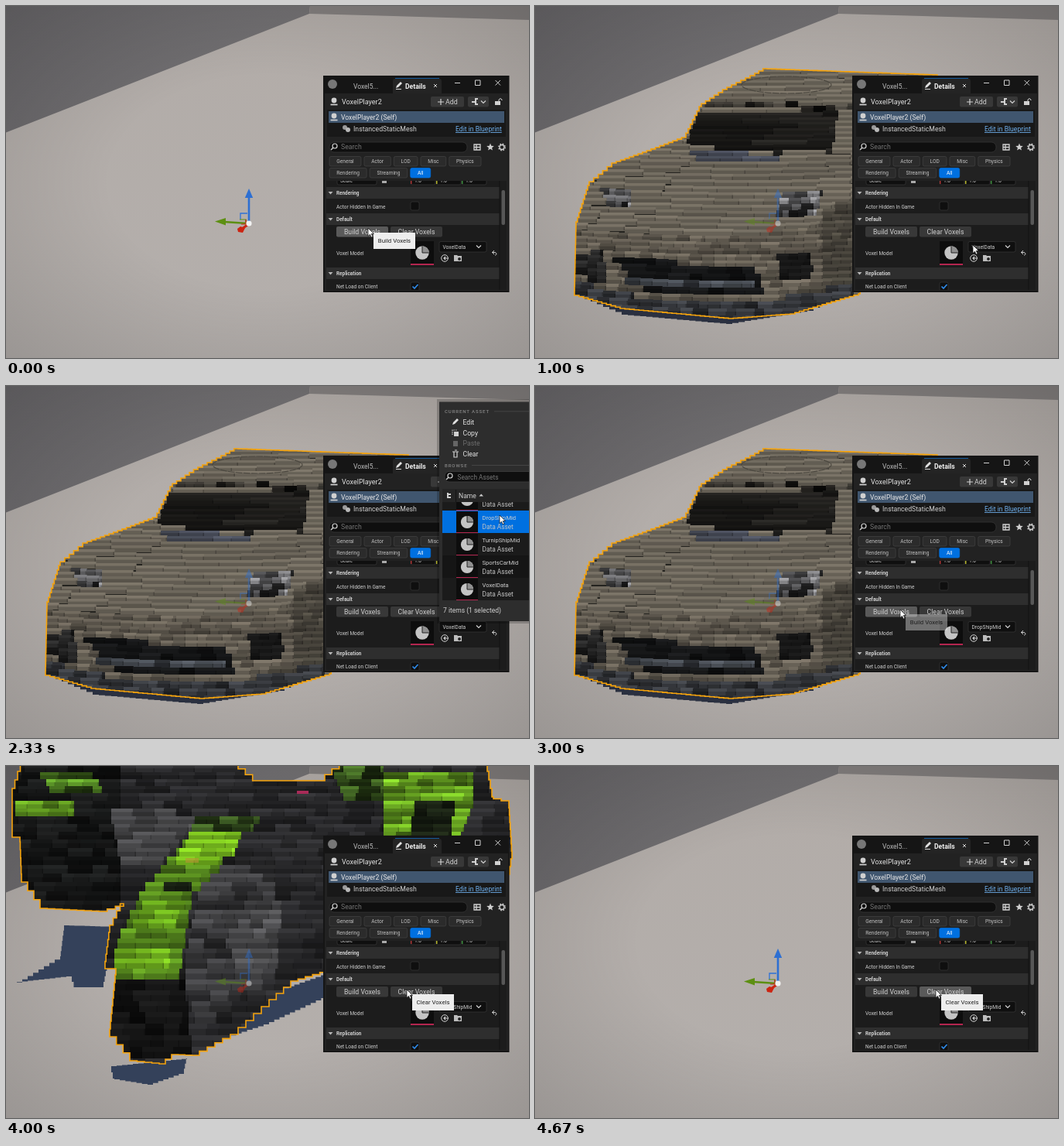
An HTML page for the animation above (5010 ms loop, 676x455 px).

```html
<!DOCTYPE html>
<html lang="en">
<head>
<meta charset="utf-8">
<title>Voxel builder</title>
<style>
html,body{margin:0;width:100%;height:100%;overflow:hidden;background:#a8a19d}
svg{display:block;width:100%;height:100%}
text{font-family:Roboto,"Open Sans",sans-serif;white-space:pre}
</style>
</head>
<body>
<svg id="stage" viewBox="0 0 676 455" preserveAspectRatio="none"></svg>
<script>
const LOOP = 5010, BEAT = 1000 / 3, LAST = 14;
const LIGHT = '#d0d0d0', INK = '#0f0f0f', BLUE = '#0070e0', STEEL = '#40566f', ORANGE = '#f5a30c';

const rect = (x, y, w, h, fill, more = '') =>
  `<rect x="${x}" y="${y}" width="${w}" height="${h}" fill="${fill}" ${more}/>`;
const text = (x, y, s, size = 8.7, fill = LIGHT, more = '') =>
  `<text x="${x}" y="${y}" font-size="${size}" fill="${fill}" ${more}>${s}</text>`;
const line = (d, stroke = LIGHT, w = 1, more = '') =>
  `<path d="${d}" fill="none" stroke="${stroke}" stroke-width="${w}" ${more}/>`;
const shape = (d, fill, more = '') => `<path d="${d}" fill="${fill}" ${more}/>`;
const disc = (x, y, r, fill, more = '') => `<circle cx="${x}" cy="${y}" r="${r}" fill="${fill}" ${more}/>`;
const group = (body, more = '') => `<g ${more}>${body}</g>`;
const each = (list, make) => list.map(make).join('');

// ---- voxel models ----
let seed = 77;
const rnd = () => (seed = seed * 16807 % 2147483647) / 2147483647;
const points = s => s.split(' ').map(p => p.split(',').map(Number));
const tint = (hex, f) =>
  `rgb(${[1, 3, 5].map(i => Math.min(255, Math.round(parseInt(hex.substr(i, 2), 16) * f)))})`;

function inside(pts, x, y) {
  let hit = false;
  pts.forEach(([ax, ay], i) => {
    const [bx, by] = pts.at(i - 1);
    if ((ay > y) !== (by > y) && x < (bx - ax) * (y - ay) / (by - ay) + ax) hit = !hit;
  });
  return hit;
}

// turns a few corner points into a blocky closed path
function stairs(outline, unit) {
  const pts = points(outline);
  let d = `M${pts.at(-1)}`;
  pts.forEach(([bx, by], i) => {
    const [ax, ay] = pts.at(i - 1);
    const n = Math.max(1, Math.round(Math.max(Math.abs(bx - ax), Math.abs(by - ay)) / unit));
    for (let k = 1; k <= n; k++)
      d += `H${(ax + (bx - ax) * k / n).toFixed(1)}V${(ay + (by - ay) * k / n).toFixed(1)}`;
  });
  return d + 'Z';
}

// Each region is [outline, colour, block width, contrast]; later regions win.
function model(id, outline, unit, { far, near, bend }, regions) {
  const areas = regions.map(([o, color, w, jitter]) => ({ pts: points(o), color, w, jitter }));
  const areaAt = (x, y) => areas.findLast(a => inside(a.pts, x, y));
  const path = stairs(outline, unit);
  let out = shape(path, '#24231f');
  for (let y = -10, h; y < 430; y += h) {
    h = Math.round(far + (near - far) * Math.max(0, y) / 400);
    const row = (rnd() - .5) * .1;
    for (let x = 0, w; x < 660; x += w) {
      const top = Math.round(y - bend * ((x - 250) / 200) ** 2);
      const area = areaAt(x + 2, top + h / 2);
      w = 4;
      if (!area) continue;
      const want = area.w * (.6 + rnd() * .8);
      while (w < want && areaAt(x + w + 2, top + h / 2) === area) w += 4;
      const f = 1 + row + (rnd() - .5) * 2 * area.jitter;
      out += rect(x, top, w + .5, h + 1, tint(area.color, f * .9))
        + rect(x, top, w + .5, h * .45, tint(area.color, f * 1.12))
        + rect(x + w - 1.5, top + h * .45, 2, h * .55, tint(area.color, f * .7));
    }
  }
  return `<clipPath id="${id}Clip"><path d="${path}"/></clipPath>`
    + group(out, `clip-path="url(#${id}Clip)"`) + line(path, ORANGE, 1.6);
}

const carEdge = '520,89 300,81 284,90 248,108 215,130 195,170 150,187 105,203 70,232 53,285 51,374 110,391 250,404 330,398 418,372';
const car = () => shape(stairs('56,372 418,366 360,394 255,411 120,399', 8), '#2a3040')
  + model('car', carEdge, 6, { far: 6, near: 9, bend: 8 }, [
    ['40,60 530,60 530,420 40,420', '#6a6459', 44, .06],
    ['222,126 412,126 412,134 216,134', '#37342f', 10, .9],
    ['212,135 392,135 384,188 300,190 194,180', '#1d1c1a', 60, .35],
    ['200,188 320,192 316,201 208,198', '#464a56', 22, .2],
    ['50,284 230,302 412,276 412,380 50,380', '#5e584e', 15, .2],
    ['372,262 412,250 412,366 372,370', '#48443c', 14, .2],
    ['84,234 126,238 126,262 96,264', '#505052', 10, .8],
    ['320,244 372,238 364,268 312,272', '#565658', 10, .8],
    ['54,322 88,316 94,358 54,350', '#232323', 12, .5],
    ['96,324 290,342 296,376 150,374', '#141516', 24, .4],
    ['112,352 284,358 284,367 118,362', '#3c4046', 18, .4],
    ['314,324 354,318 360,348 316,352', '#151515', 13, .4],
    ['50,356 150,380 290,384 412,358 412,420 50,420', '#303236', 16, .4]
  ])
  + '<ellipse cx="325" cy="102" rx="58" ry="11" fill="none" stroke="#4c4840" stroke-width="1.2" stroke-dasharray="9 1"/>';

const shipEdge = '22,-4 8,40 8,92 18,98 20,150 44,184 120,188 152,178 134,215 128,262 142,270 134,350 160,381 198,385 ' +
  '214,373 240,374 290,347 340,302 368,278 415,264 640,200 654,110 650,45 630,40 622,-4 440,-4 412,19 328,19 300,-4';
const ship = () => group(each([
  '75,206 142,208 126,286 90,286 85,272 14,280 70,246',
  '136,388 234,378 230,398 190,412 140,404',
  '262,360 345,292 414,268 414,300 340,334'
], o => shape(stairs(o, 7), '#34415a')))
  + model('ship', shipEdge, 10, { far: 9, near: 16, bend: 0 }, [
    ['0,-9 670,-9 670,400 0,400', '#262628', 24, .35],
    ['0,-9 150,-9 150,190 0,190', '#151616', 21, .5],
    ['12,48 88,46 88,66 12,70', '#5f9620', 20, .3],
    ['40,6 110,4 124,34 60,34', '#426b1d', 18, .6],
    ['134,54 250,62 232,90 200,128 150,132', '#454547', 24, .25],
    ['246,66 330,66 310,90 236,90', '#30481c', 20, .5],
    ['420,0 490,0 490,50 440,48', '#304a1a', 20, .6],
    ['258,130 350,112 350,270 250,340 226,274', '#363638', 22, .4],
    ['280,186 356,176 350,262 300,280', '#48484a', 22, .25],
    ['490,10 606,4 604,46 588,92 486,92', '#5a8e1d', 21, .45],
    ['528,42 580,42 576,92 524,92', '#1a2214', 20, .4],
    ['136,266 230,268 240,374 134,384', '#121212', 19, .5],
    ['236,90 304,90 270,140 240,170 224,274 136,272 142,232 178,160', '#4d7a1b', 22, .25],
    ['236,90 304,90 298,110 262,130 216,132', '#7bc01f', 26, .15],
    ['182,172 234,172 218,206 162,206', '#649f1c', 22, .2],
    ['140,234 212,234 212,256 138,256', '#6fae1e', 22, .15],
    ['204,147 240,147 240,168 204,168', '#182013', 20, .2]
  ])
  + rect(232, 119, 17, 6, '#b99435', 'opacity=".6"') + rect(376, 32, 15, 4, '#a82b58');

// ---- editor widgets ----
const pie = (x, y, r) => disc(x, y, r, '#c4c4c4')
  + shape(`M${x} ${y}v${-r}a${r} ${r} 0 0 1 ${r} ${r}z`, '#8f8f8f') + line(`M${x} ${y - r}v${r}h${r}`, '#222');
const thumb = (x, y, s) => rect(x, y, s, s + 1, '#0d0d0d') + pie(x + s / 2, y + s / 2, s * .29) + rect(x, y + s - 1, s, 2, '#b3254f');
const lens = (x, y) => line(`M${x - 2} ${y + 2}l-3 3`, LIGHT, 1.5) + disc(x, y, 3, 'none', `stroke="${LIGHT}" stroke-width="1.2"`);
const field = (x, y, w, h, r = 2) => rect(x, y, w, h, INK, `rx="${r}" stroke="#383838" stroke-width=".7"`);
const chevron = (x, y) => line(`M${x - 3} ${y - 1.5}l3 3 3-3`, LIGHT, 1.2);
const pencil = (x, y) => shape(`M${x} ${y}l1-3 5-5 2 2-5 5z`, '#e0e0e0');
const actor = (x, y) => disc(x, y, 3.4, LIGHT) + line(`M${x - 4.5} ${y + 5.5}h9`, LIGHT, 1.7);
const header = (y, label) => rect(414, y, 224, 15, '#2e2e2e') + shape(`M416.5 ${y + 6}h6l-3 3.6z`, '#b8b8b8')
  + text(427, y + 10, label, 6.4, LIGHT, 'font-weight="700"');
const button = (id, x, label) => rect(x, 285, 67, 13.5, '#383838', `id="${id}" rx="2"`)
  + text(x + 33.5, 295, label, 8.7, LIGHT, 'text-anchor="middle"');

const pen = document.createElement('canvas').getContext('2d');
pen.font = '66px Roboto, sans-serif';
function pills(y, labels) {
  let x = 418;
  return each(labels, label => {
    const w = pen.measureText(label).width / 10 + 18.5, on = label === 'All', left = x;
    x += w + 4;
    return rect(left, y, w, 12.5, on ? BLUE : '#2b2b2b', `rx="2" stroke="${on ? BLUE : '#444'}" stroke-width=".7"`)
      + text(left + w / 2, y + 8.7, label, 6.6, on ? '#fff' : '#c0c0c0', 'text-anchor="middle"');
  });
}

const titleBar = () => rect(410, 90, 240.5, 280, '#151515') + disc(422, 101, 6, '#777')
  + text(449, 106.5, 'Voxel5...', 8.5, '#bcbcbc')
  + shape('M500 113V97q0-3 3-3h57q3 0 3 3v16z', '#242424') + rect(503, 93, 57, 1, '#155a9c')
  + pencil(504, 106) + line('M504 107.5h7') + text(516, 106.5, 'Details', 8.6, '#f0f0f0', 'font-weight="700"')
  + line('M553 101l4 4m0-4l-4 4M580 99.5h7M606.5 96h6.5v6.5h-6.5zM632.5 96l6.5 6.5m0-6.5l-6.5 6.5');

const actorTree = () => rect(412, 113, 237, 255, '#222')
  + actor(424, 122) + text(434, 127, 'VoxelPlayer2', 9, '#e0e0e0')
  + rect(549, 117, 43, 13.5, '#383838', 'rx="2"') + line('M558 124h8M562 120v8', LIGHT, 1.2) + text(568, 127, 'Add', 8.9)
  + rect(597, 117, 27, 13.5, '#383838', 'rx="2"') + line('M602 124h6m2-4h-3v7h3', LIGHT, 2) + chevron(617, 124)
  + rect(632, 123, 7, 5, LIGHT) + line('M637 123v-2q2-3 4 0v1')
  + rect(415, 134, 231, 35, '#181818') + rect(417, 136, 227, 15, STEEL)
  + actor(424, 142) + text(433, 147, 'VoxelPlayer2 (Self)', 8.6, '#e8e8e8')
  + disc(438, 157, 3, '#9a9a9a') + disc(442, 160, 3, '#b8b8b8') + text(449, 162, 'InstancedStaticMesh')
  + text(581, 162, 'Edit in Blueprint', 8.6, '#6fb0ee', 'text-decoration="underline"');

const star = (x, y, r) => 'M' + Array.from({ length: 10 }, (_, i) => {
  const a = i * Math.PI / 5, d = i % 2 ? r * .45 : r;
  return [x + d * Math.sin(a), y - d * Math.cos(a)].map(n => n.toFixed(1));
}).join('L') + 'Z';
const filters = () => field(418, 176, 178, 13, 6) + lens(425, 181) + text(433, 185, 'Search', 8.7, '#747474')
  + line('M605 179h8v7h-8zM605 182.5h8M608 179v7', LIGHT, 1.3) + shape(star(626, 182.5, 5), LIGHT)
  + disc(641, 182.5, 3, 'none', `stroke="${LIGHT}" stroke-width="1.3"`)
  + disc(641, 182.5, 4.3, 'none', `stroke="${LIGHT}" stroke-width="1.3" stroke-dasharray="1.7 1.7"`)
  + pills(194.5, ['General', 'Actor', 'LOD', 'Misc', 'Physics']) + pills(209.5, ['Rendering', 'Streaming', 'All']);

const properties = () => rect(414, 226, 233, 141, '#1c1c1c')
  + field(428, 222, 51, 9) + text(432, 228, 'Scale', 6.5) + rect(486, 225, 6, 4, '#aaa')
  + each(['#a33', '#b5b52a', '#3a8a3a'], (c, i) => field(523 + i * 33, 222, 32, 9)
    + rect(523 + i * 33, 224, 1.5, 6, c) + text(528 + i * 33, 228, '1.0', 6.5))
  + header(234, 'Rendering') + text(427, 261.5, 'Actor Hidden In Game', 6.5) + field(523, 253, 11, 11)
  + header(268, 'Default') + button('build', 427, 'Build Voxels') + button('clear', 497, 'Clear Voxels')
  + text(427, 322, 'Voxel Model', 6.5) + thumb(523, 304, 30)
  + field(560, 304.5, 61, 13.5) + text(564.5, 313.7, '', 6.6, LIGHT, 'id="pick"') + chevron(611, 311)
  + disc(567, 326, 4.3, 'none', `stroke="${LIGHT}"`) + line('M572 326h-6m2-2l-2 2 2 2', LIGHT, 1.2)
  + shape('M579 322h4l1 1h5v7h-10z', '#bdbdbd') + disc(586, 327, 2.5, '#222', `stroke="${LIGHT}"`)
  + line('M628.5 318.5h4q3 1.5 0 4M631 316l-2.5 2.5 2.5 2.5')
  + header(338, 'Replication') + text(427, 365, 'Net Load on Client', 6.5)
  + field(523, 357, 11, 11) + line('M525.5 362.5l2.5 2.5 4.5-5', '#2f8be8', 1.7)
  + rect(637.5, 226, .8, 141, '#111') + rect(640.5, 238, 4.5, 45, '#575757', 'rx="2"');

const panel = () => titleBar() + actorTree() + filters() + group(properties(), 'clip-path="url(#listClip)"');

const assets = ['DropShip', 'DropShipMid', 'TurnipShipMid', 'SportsCarMid', 'VoxelData'];
const shade = i => i % 2 ? '#151515' : '#1b1b1b';
function menu() {
  const caption = (y, s, x) => text(567, y, s, 6.1, '#858585', 'letter-spacing=".85" font-weight="500"') + rect(x, y - 2.5, 676 - x, .8, '#4a4a4a');
  const entry = (name, i) => {
    const y = 132 + i * 29;
    return rect(564, y, 112, 29, shade(i), `id="row${i}"`) + thumb(582, y + 1, 28)
      + text(615.5, y + 12, name, 7.6) + text(615.5, y + 24, 'Data Asset', 8.3, '#c4c4c4');
  };
  return rect(557, 17, 125, 290, '#000', 'opacity=".2"') + rect(560, 20.5, 120, 283.5, '#2d2d2d')
    + caption(35, 'CURRENT ASSET', 631) + caption(104.5, 'BROWSE', 602)
    + each(['Edit', 'Copy', 'Paste', 'Clear'], (s, i) => text(590.5, 50 + i * 13.7, s, 8.7, s === 'Paste' ? '#6d6d6d' : '#e4e4e4'))
    + pencil(577, 50) + rect(579, 59, 6, 6, LIGHT) + line('M577 63v-6h6', LIGHT, 1.2, 'stroke-dasharray="1.5 1"')
    + rect(578, 71, 6, 7, '#666') + line('M577 85h8M579 85v7h4v-7M580 83h3', LIGHT, 1.2)
    + rect(567, 110.5, 116, 13.5, INK, 'id="search" rx="6"') + lens(574, 116) + text(583.5, 120.5, 'Search Assets', 8.3, '#777')
    + rect(582.5, 112.5, 1, 9.5, LIGHT, 'id="caret"')
    + rect(564, 133, 112, 17, '#252525') + line('M571 138v7m0-5h4m-4 4h4', LIGHT, 2)
    + rect(581, 134, .8, 16, '#111') + text(585, 145, 'Name', 8.6) + shape('M611.5 142.5h5.5l-2.75-3z', LIGHT)
    + group(each(assets, entry), 'clip-path="url(#menuClip)"')
    + text(565, 292.5, '7 items (1 selected)', 8.5);
}

const gizmo = () => line('M303 276v-8h9', '#2e72d8', 1.3)
  + line('M314 280V247', '#2d6fd2', 2.6) + shape('M314 236l5.2 12h-10.4z', '#2d6fd2')
  + line('M312 281l-30-2', '#5d8f12', 2.6) + shape('M270 278.5l14-4.5v9.5z', '#5d8f12') + line('M302 276h8v6', '#5d8f12', 1.2)
  + line('M312 283l-7 5', '#cc2412', 3) + line('M304 282h6v-6', '#cc2412', 1.2)
  + shape('M299 288l4-3 6 2-3 6-6-1z', '#cc2412') + disc(314, 281, 3.6, '#f1f1f1');

const room = () => rect(0, 0, 676, 455, 'url(#floor)')
  + shape('M0 0H393L392 10L0 163.5Z', 'url(#wall)') + shape('M393 0H676V18L392 10Z', '#827e7d')
  + rect(0, 0, 676, 455, 'url(#vignette)');

const stage = document.getElementById('stage');
stage.innerHTML = `<defs>
<linearGradient id="floor" x1="0" y1="0" x2="0" y2="1"><stop offset="0" stop-color="#b2aca8"/><stop offset="1" stop-color="#b4afac"/></linearGradient>
<linearGradient id="wall" x1="0" y1="0" x2="1" y2=".3"><stop offset="0" stop-color="#69676a"/><stop offset="1" stop-color="#737173"/></linearGradient>
<radialGradient id="vignette" r=".75"><stop offset=".4" stop-color="#000" stop-opacity="0"/><stop offset="1" stop-color="#000" stop-opacity=".16"/></radialGradient>
<clipPath id="listClip"><rect x="412" y="226" width="238" height="141"/></clipPath>
<clipPath id="menuClip"><rect x="560" y="150" width="116" height="127"/></clipPath></defs>`
  + room() + group(car(), 'id="car"') + shape(stairs(carEdge, 6), '#8c8e92', 'id="haze" opacity=".16"') + group(ship(), 'id="ship"')
  + group(gizmo(), 'id="gizmo"') + panel() + group(menu(), 'id="menu"')
  + group(rect(593, 316, 140, 22, '#a0a0a0') + text(599.5, 329.5, '/Game/VoxelModels/VoxelData', 7.5, '#2c2c2c'), 'id="path" opacity=".8"')
  + group(rect(0, 0, 54, 21, '#ededed') + text(27, 13, '', 7.8, '#222', 'id="tipText" text-anchor="middle"'), 'id="tip"')
  + group(shape('M0 0V10.5L2.5 8.2L4.2 12L6 11.2L4.3 7.5H7.5Z', '#fff', 'stroke="#111" stroke-width=".7"'), 'id="cursor"');

// ---- timeline, counted in beats of a third of a second ----
const $ = id => document.getElementById(id);
const show = (id, on) => $(id).style.display = on ? '' : 'none';
const set = (id, name, value) => $(id).setAttribute(name, value);
const within = (b, from, to) => b >= from && b <= to;

// the pointer rests at each stop from its beat on
const stops = [[0, 468, 287], [3, 566, 309], [4, 584, 309], [5, 632, 258], [6, 638, 176], [7, 638, 167],
  [8, 540, 268], [9, 472, 289], [11, 518, 289]];

function draw(b) {
  const [, x, y] = stops.findLast(s => s[0] <= b);
  const hasCar = within(b, 2, 10 - 1), hasShip = within(b, 10, 12);
  show('car', hasCar);
  show('haze', b === 2);
  show('ship', hasShip);
  set('gizmo', 'opacity', hasCar || hasShip ? .45 : 1);

  const overBuild = b < 3 || within(b, 9, 10), overClear = b >= 11;
  set('build', 'fill', overBuild ? '#5a5a5a' : '#383838');
  set('clear', 'fill', overClear && b !== 12 ? '#5a5a5a' : '#383838');
  show('tip', overBuild || overClear);
  set('tip', 'transform', `translate(${x + 7} ${y + 6})`);
  set('tip', 'opacity', b === 9 || b === 11 ? .4 : 1);
  $('tipText').textContent = overClear ? 'Clear Voxels' : 'Build Voxels';
  $('pick').textContent = b < 8 ? 'VoxelData' : 'DropShipMid';

  const chosen = b === 7;
  show('menu', within(b, 4, 7));
  show('path', b === 4);
  show('caret', !chosen && b % 2 === 0);
  set('search', 'stroke', chosen ? '#383838' : BLUE);
  assets.forEach((_, i) => set('row' + i, 'fill',
    chosen && i === 1 ? BLUE : !chosen && i === 4 ? STEEL : b === 6 && i === 1 ? '#2b2b2b' : shade(i)));
  set('cursor', 'transform', `translate(${x} ${y})`);
}

const start = performance.now();
let shown = -1;
function frame() {
  const t = (performance.now() - start) % LOOP;
  const beat = Math.min(LAST, Math.floor((t + 4) / BEAT));
  if (beat !== shown) draw(shown = beat);
  requestAnimationFrame(frame);
}
frame();
</script>
</body>
</html>
```
